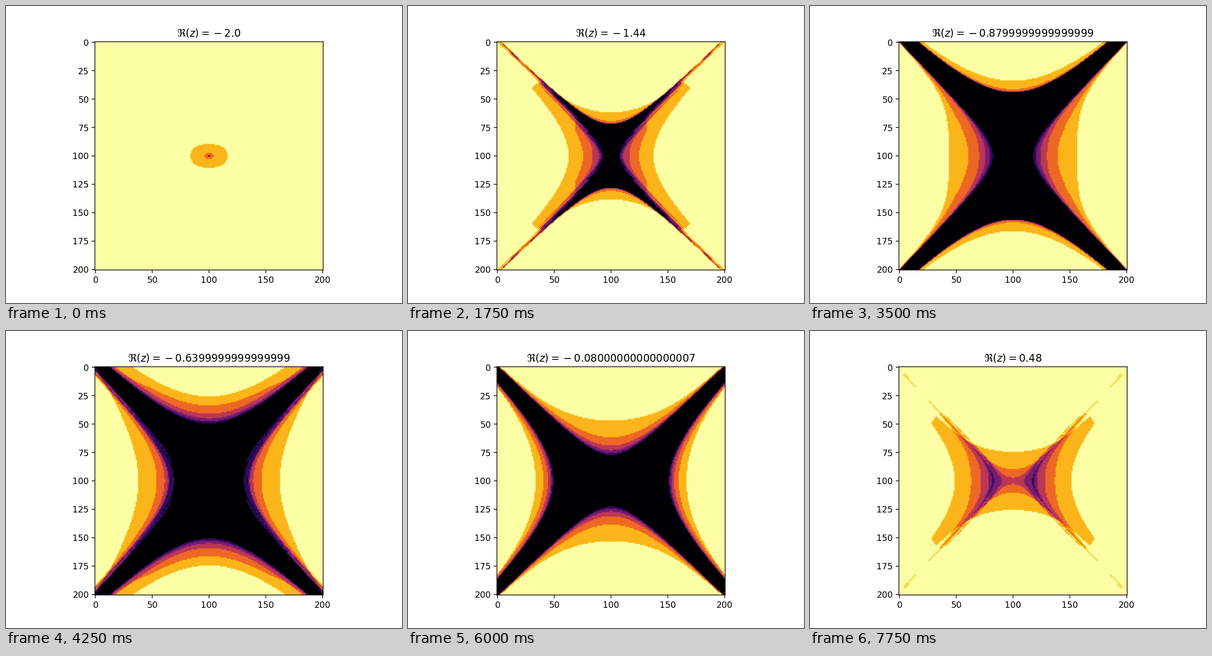
These frames come from a looping animation (864x648 px, 8 s). A matplotlib script:

```python
import numpy as np
import matplotlib.pyplot as plt
from matplotlib.animation import FuncAnimation

WIDTH, HEIGHT, DPI = 864, 648, 135
LEFT, BOTTOM, SIDE = 194, 72, 498  # plot box in pixels
FRAMES = 32
STEPS = 8
LEVELS = 6
LIMIT = 12  # squared radius of the bounded region

reals = np.linspace(-2, 2, 51)
axis = np.linspace(-2, 2, 201)
x, y = np.meshgrid(axis, axis)
square = y**2 - x**2  # square of the split-quaternion vector part
length = x**2 + y**2


def escape_levels(real):
    """Count the steps of q -> q*q + c that lie outside the radius."""
    scalar = np.full_like(x, real)
    scale = np.ones_like(x)  # vector part as a multiple of that of c
    outside = np.zeros_like(x)
    for _ in range(STEPS - 1):
        scalar, scale = (scalar**2 + scale**2 * square + real,
                         2 * scalar * scale + 1)
        outside += scalar**2 + scale**2 * length > LIMIT
    return np.minimum(outside, LEVELS)


def label(real):
    # The empty group keeps the minus sign spaced like an operator.
    sign = "{}-" if real < 0 else ""
    return rf"$\Re(z)={sign}{abs(float(real))}$"


fig = plt.figure(figsize=(WIDTH / DPI, HEIGHT / DPI), dpi=DPI)
ax = fig.add_axes([LEFT / WIDTH, BOTTOM / HEIGHT, SIDE / WIDTH, SIDE / HEIGHT])
image = ax.imshow(escape_levels(reals[0]), cmap="inferno",
                  vmin=0, vmax=LEVELS)
title = ax.set_title(label(reals[0]))


def update(i):
    image.set_data(escape_levels(reals[i]))
    title.set_text(label(reals[i]))
    return image, title


anim = FuncAnimation(fig, update, frames=FRAMES, interval=250,
                     repeat=True, repeat_delay=0)
plt.show()
```
